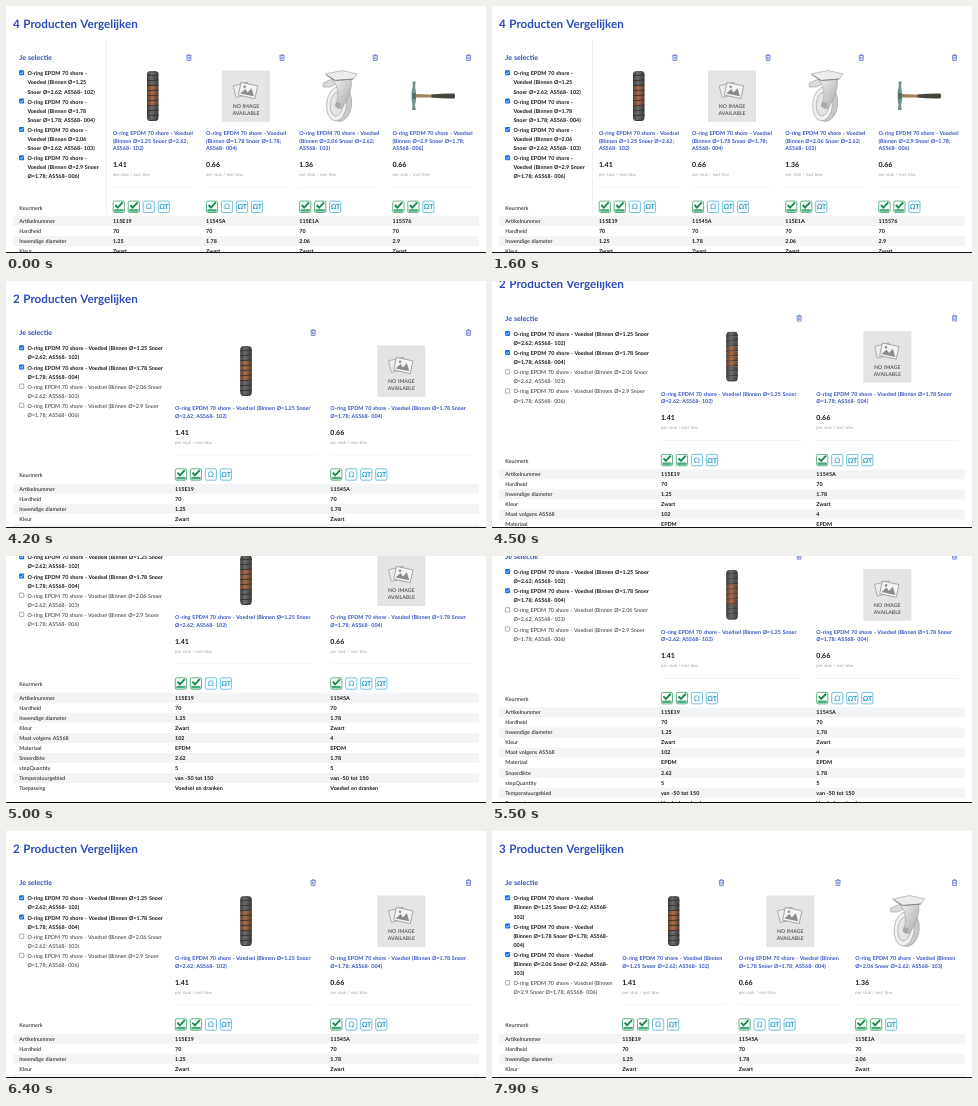
Write an HTML page that moves like this. It is 480 by 247 pixels and loops after 8 s.

```html
<!DOCTYPE html>
<html lang="nl">
<head>
<meta charset="utf-8">
<title>Producten vergelijken</title>
<style>
  html, body { margin: 0; width: 100%; height: 100%; overflow: hidden; background: #fff; }
  svg { display: block; width: 480px; height: 247px; }
  text { font-family: Lato, "Open Sans", sans-serif; word-spacing: .06em; text-rendering: geometricPrecision; white-space: pre; }
</style>
</head>
<body>
<svg id="stage" viewBox="0 0 480 247">
  <defs>
    <linearGradient id="steel"><stop offset="0" stop-color="#3a3a3a"/><stop offset=".4" stop-color="#6e6c6a"/><stop offset="1" stop-color="#383838"/></linearGradient>
    <linearGradient id="copper"><stop offset="0" stop-color="#5a4032"/><stop offset=".45" stop-color="#ad6c48"/><stop offset="1" stop-color="#4e3a30"/></linearGradient>
    <linearGradient id="chrome" x2="1" y2="1"><stop offset="0" stop-color="#f2f2f2"/><stop offset="1" stop-color="#a8a8a8"/></linearGradient>
    <g id="trash" fill="none" stroke="#4a64cc" stroke-width=".7">
      <path d="M-2.7 -2H2.7M-1 -2.1V-3H1V-2.1M-2.1 -1.9L-1.8 2.8H1.8L2.1 -1.9M-.7 -.8V1.7M.7 -.8V1.7"/>
    </g>
    <g id="check">
      <rect x=".5" y=".5" width="11.2" height="11.4" rx="1.4" fill="#fff" stroke="#35a268" stroke-width=".8"/>
      <path d="M2.6 4.4L5 7L10 1.8" fill="none" stroke="#168a4a" stroke-width="1.9"/>
      <rect x="1.5" y="8.6" width="9.2" height="2.4" fill="#48aa76"/>
    </g>
    <g id="ohm">
      <rect x=".5" y=".5" width="11.2" height="11.4" rx="1.4" fill="#f7fcfe" stroke="#55b4da" stroke-width=".8"/>
      <text x="6.1" y="8.9" font-size="7.6" fill="#2b9bcb" text-anchor="middle">Ω</text>
    </g>
    <g id="ohmT">
      <rect x=".5" y=".5" width="11.2" height="11.4" rx="1.4" fill="#f7fcfe" stroke="#55b4da" stroke-width=".8"/>
      <text x="6.1" y="8.8" font-size="7" font-weight="700" fill="#2b9bcb" text-anchor="middle" letter-spacing="-.4">ΩT</text>
    </g>
    <clipPath id="capsule"><rect x="-5.9" y="-25" width="11.8" height="50" rx="4"/></clipPath>
    <g id="rod" clip-path="url(#capsule)"></g>
    <g id="blank">
      <rect x="-24" y="-25.5" width="48" height="51.5" fill="#e4e4e4"/>
      <rect x="-10" y="-13" width="15" height="12" fill="#ececec" stroke="#a4a4a4" stroke-width=".8" transform="rotate(-14)"/>
      <g transform="translate(2 -5.5) rotate(12)">
        <rect x="-8.5" y="-6.5" width="17" height="13" fill="#f3f3f3" stroke="#999" stroke-width=".8"/>
        <path d="M-7 4.5L-3 -1L0 2L3 -3L7 4.5Z" fill="#8c8c8c"/><circle cx="-4" cy="-3" r="1.3" fill="#8c8c8c"/>
      </g>
      <g font-size="5.2" font-weight="700" fill="#626262" text-anchor="middle">
        <text y="12.4">NO IMAGE</text><text y="19">AVAILABLE</text>
      </g>
    </g>
    <g id="caster" stroke="#9c9c9c" stroke-width=".6">
      <path d="M-7 -17L-16 -13L-16 -9L-9 -9L-3 -12Z" fill="#dadada"/>
      <ellipse cx="1" cy="8" rx="11.5" ry="17.5" fill="#c9c9c9" transform="rotate(6 1 8)"/>
      <ellipse cx="-2.5" cy="8" rx="10" ry="17" fill="#f0f0f0" transform="rotate(6 -2.5 8)"/>
      <ellipse cx="-2.5" cy="8" rx="6.5" ry="12" fill="#e4e4e4" transform="rotate(6 -2.5 8)"/>
      <path d="M-7 -17L12 -18Q14 -4 3 12Q-1 14 -4 10Q3 -5 -7 -17Z" fill="url(#chrome)"/>
      <path d="M-14 -22L3 -25.5L18 -22L14 -17L-4 -15.5Z" fill="#ededed"/>
      <path d="M-13 -21L-4 -15.5L14 -17" fill="none" stroke="#868686" stroke-width="1"/>
      <circle cx="-1" cy="9" r="2.3" fill="#aaa"/>
    </g>
    <g id="hammer">
      <path d="M-17 -2L1 -1.3V1.5L-17 1.4Z" fill="#a5805c"/>
      <path d="M-1 -1.4Q10 -2.6 22 -2.5Q23.5 0 22 2.5Q10 2.8 -1 1.6Z" fill="#49443a"/>
      <path d="M-20 -14.5H-16.6L-17.3 -10L-16.4 -3V4L-17.3 9L-16.6 14H-20.6L-19.9 9L-20.8 3V-4L-19.6 -10Z" fill="#6c948e"/>
      <path d="M-20 -3H-16.8V3H-20Z" fill="#466e6a"/>
    </g>
  </defs>
</svg>
<script>
const stage = document.getElementById('stage');
const BLUE = '#2c4bbd', INK = '#161616', SIZE = 5.42;

const products = [
  { inner: '1.25', cord: '2.62', code: '102', art: '115E19', price: '1.41', picture: 'rod', marks: 'check check ohm ohmT' },
  { inner: '1.78', cord: '1.78', code: '004', art: '11545A', price: '0.66', picture: 'blank', marks: 'check ohm ohmT ohmT' },
  { inner: '2.06', cord: '2.62', code: '103', art: '115E1A', price: '1.36', picture: 'caster', marks: 'check check ohmT' },
  { inner: '2.9', cord: '1.78', code: '006', art: '115576', price: '0.66', picture: 'hammer', marks: 'check check ohmT' }
];

const rows = [
  ['Artikelnummer', p => p.art],
  ['Hardheid', () => '70'],
  ['Inwendige diameter', p => p.inner],
  ['Kleur', () => 'Zwart'],
  ['Maat volgens AS568', p => +p.code],
  ['Materiaal', () => 'EPDM'],
  ['Snoerdikte', p => p.cord],
  ['stepQuantity', () => '5'],
  ['Temperatuurgebied', () => 'van -50 tot 150'],
  ['Toepassing', () => 'Voedsel en dranken']
];

const text = (x, y, s, size = SIZE, weight = 400, fill = INK) =>
  `<text x="${x}" y="${y}" font-size="${size}" font-weight="${weight}" fill="${fill}">${s}</text>`;
const box = (x, y, w, h, fill) => `<rect x="${x}" y="${y}" width="${w}" height="${h}" fill="${fill}"/>`;
const use = (id, x, y) => `<use href="#${id}" transform="translate(${x} ${y})"/>`;

// Splits a product name into lines, each ending before the given word index.
function nameLines(p, breaks) {
  const words = `O-ring EPDM 70 shore - Voedsel (Binnen Ø=${p.inner} Snoer Ø=${p.cord}; AS568- ${p.code})`.split(' ');
  return breaks.map((end, i) => words.slice(breaks[i - 1] || 0, end).join(' '));
}

function checkbox(y, on) {
  return on
    ? `<rect x="13.1" y="${y}" width="5" height="5" rx=".8" fill="#1470e0"/><path d="M14.2 ${y + 2.6}l1.1 1.1l1.9 -2.3" fill="none" stroke="#fff" stroke-width=".8"/>`
    : `<rect x="13.4" y="${y + .3}" width="4.4" height="4.4" rx=".7" fill="#fff" stroke="#7a7a7a" stroke-width=".6"/>`;
}

function sidebar(count) {
  let y = 69.3;
  return products.map((p, i) => {
    const on = i < count;
    const breaks = count === 4 ? [5, i === 3 ? 9 : 8, 12]
      : count === 3 ? (on ? [6, 11, 12] : [7, 12]) : [9, 12];
    let out = checkbox(y - 5, on);
    for (const line of nameLines(p, breaks)) {
      out += text(21.4, y, line, SIZE, on ? 700 : 400, on ? INK : '#333');
      y += 9.1;
    }
    y += 1;
    return out;
  }).join('');
}

function page(count) {
  const width = 466 / (count + 1);
  const shift = count === 4 ? 7.3 : 0;
  const rowY = i => 209.6 + shift + i * 10.05;
  const breaks = { 4: [6, 10, 12], 3: [7, 12], 2: [9, 12] }[count];
  let out = text(7, 21.9, `${count} Producten Vergelijken`, 11.67, 700, BLUE)
    + text(13.3, 54, 'Je selectie', 7, 700, BLUE) + sidebar(count)
    + text(13.3, 196.3 + shift, 'Keurmerk');
  if (count === 4) out += box(100, 34, 1, 175, '#f1f1f1');
  rows.forEach(([label], i) => {
    if (i % 2 === 0) out += box(7, rowY(i) - 6.9, 466, 10, '#f3f4f5');
    out += text(13.3, rowY(i), label);
  });
  products.slice(0, count).forEach((p, i) => {
    const left = 7 + width * (i + 1), x = left + 6.7;
    out += use('trash', left + width - 10.5, 51.7) + use(p.picture, left + width / 2, 90)
      + box(x, 173.5 + shift, width - 13.4, .8, '#f1f1f1');
    nameLines(p, breaks).forEach((line, k) => out += text(x, 129.3 + k * 7.2, line, SIZE, 700, '#3653c4'));
    out += text(x, 153.6 + shift, p.price, 7, 700)
      + text(x, 162.6 + shift, 'per stuk / excl btw', 4.4, 400, '#a5a5a5');
    p.marks.split(' ').forEach((id, k) => out += use(id, x - .2 + k * 15, 187.3 + shift));
    rows.forEach(([, value], k) => out += text(x, rowY(k), value(p), SIZE, 700));
  });
  return out;
}

document.getElementById('rod').innerHTML = Array.from({ length: 10 }, (_, i) => {
  const y = -25 + i * 5;
  return box(-5.9, y, 11.8, 5.1, `url(#${i > 2 && i < 7 ? 'copper' : 'steel'})`)
    + `<path d="M-6 ${y + 4.8}L6 ${y + 4}" stroke="#333" stroke-width=".9"/>`;
}).join('');

const pages = {};
for (const count of [4, 3, 2]) {
  pages[count] = document.createElementNS('http://www.w3.org/2000/svg', 'g');
  pages[count].innerHTML = page(count);
  stage.append(pages[count]);
}
stage.insertAdjacentHTML('beforeend', box(0, 246, 480, 1, '#111'));

function ease(t, from, to) {
  const u = Math.min(1, Math.max(0, (t - from) / (to - from)));
  return u * u * (3 - 2 * u);
}

function draw(now) {
  const t = now % 8000;
  const shown = t < 2200 ? 4 : t < 3200 ? 3 : t < 6700 ? 2 : 3;
  const scroll = 66 * (ease(t, 4350, 4850) - ease(t, 5370, 5800));
  for (const count in pages) pages[count].style.display = +count === shown ? '' : 'none';
  pages[shown].setAttribute('transform', `translate(0 ${-scroll})`);
}

const start = performance.now();
function tick() {
  draw(performance.now() - start);
  requestAnimationFrame(tick);
}
tick();
</script>
</body>
</html>
```
